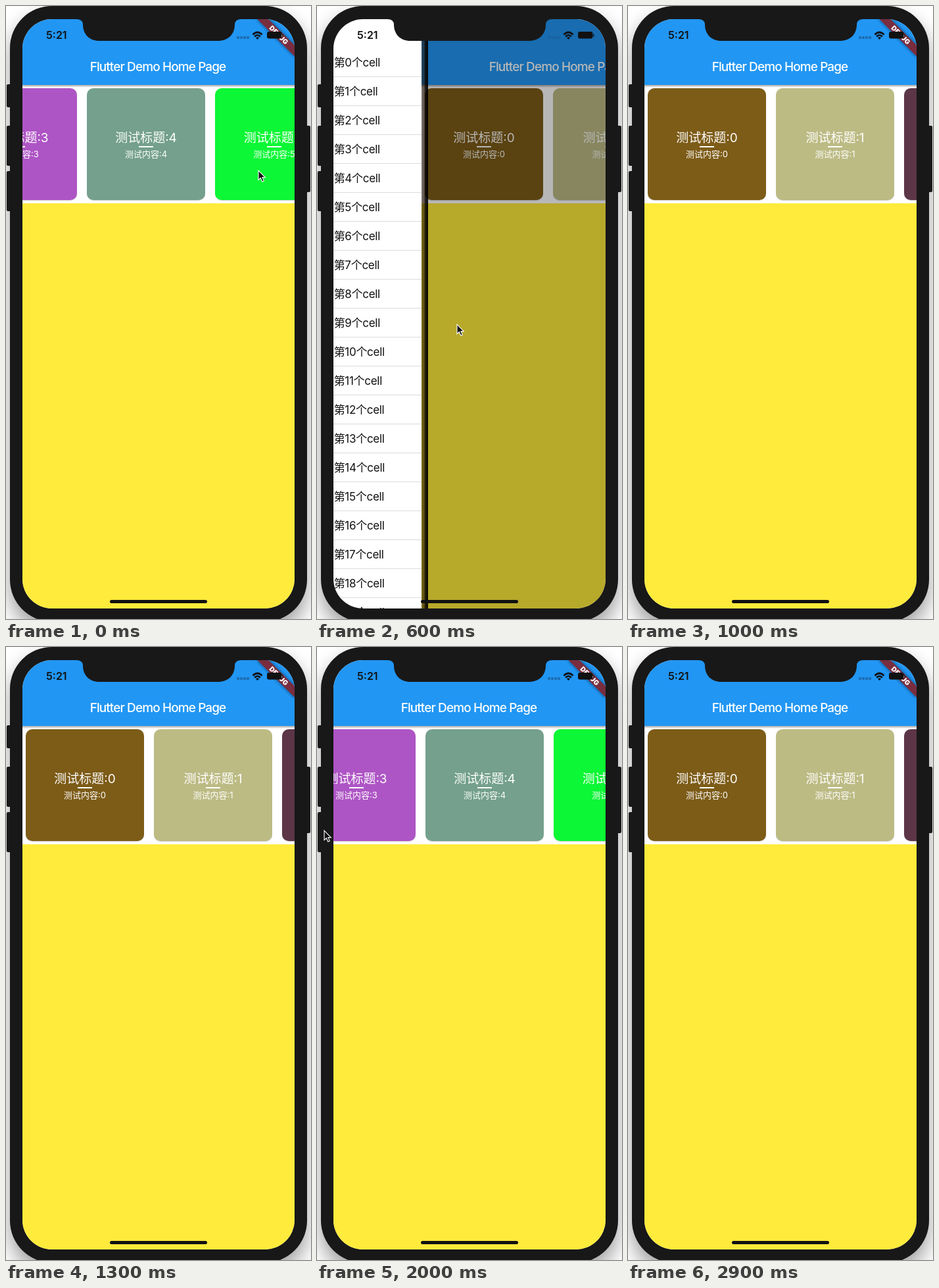
An HTML page that plays this animation: 464 by 932 pixels, repeating every 3000 ms.

```html
<!DOCTYPE html>
<html lang="zh">
<head>
<meta charset="utf-8">
<style>
html, body { margin: 0; width: 100%; height: 100%; overflow: hidden; background: #fff; }
svg { display: block; width: 464px; height: 932px; }
text { font-family: Inter, "Noto Sans CJK SC", "Noto Sans CJK", sans-serif; }
.bar { font-size: 19px; font-weight: 500; letter-spacing: -.9px; fill: #fff; text-anchor: middle; }
.card { fill: #fff; text-anchor: middle; }
.title { font-size: 19px; }
.note { font-size: 13px; }
.cell { font-size: 17px; letter-spacing: -.3px; fill: #111; }
.prefix { letter-spacing: -.5px; text-anchor: end; }
</style>
</head>
<body>
<svg viewBox="0 0 464 932">
  <defs>
    <clipPath id="screen"><rect x="25" y="20" width="414" height="896" rx="45"/></clipPath>
    <filter id="blur" x="-20%" y="-20%" width="140%" height="140%"><feGaussianBlur stdDeviation="15"/></filter>
    <filter id="soft" x="-30%" y="-30%" width="160%" height="160%"><feGaussianBlur stdDeviation="3"/></filter>
    <linearGradient id="edge">
      <stop offset="0" stop-color="#2a1400" stop-opacity=".4"/>
      <stop offset=".4" stop-color="#1c0e00" stop-opacity=".6"/>
      <stop offset=".6" stop-color="#0a0500" stop-opacity=".88"/>
      <stop offset="1" stop-opacity=".93"/>
    </linearGradient>
    <linearGradient id="drop" x2="0" y2="1">
      <stop offset="0" stop-opacity=".35"/><stop offset="1" stop-opacity="0"/>
    </linearGradient>
  </defs>

  <rect x="6" y="16" width="452" height="935" rx="62" opacity=".38" filter="url(#blur)"/>
  <g fill="#181818">
    <rect x="6" width="452" height="936" rx="64"/>
    <rect x="1" y="119" width="8" height="35" rx="2"/>
    <rect x="1" y="182" width="8" height="61" rx="2"/>
    <rect x="1" y="251" width="8" height="61" rx="2"/>
    <rect x="455" y="182" width="8" height="101" rx="2"/>
  </g>

  <g clip-path="url(#screen)">
    <rect x="25" y="20" width="414" height="896" fill="#fff"/>
    <g id="drawer"></g>
    <g id="page">
      <rect x="25" y="120" width="414" height="180" fill="#fff"/>
      <svg x="25" y="120" width="414" height="180" viewBox="25 120 414 180"><g id="cards"></g></svg>
      <rect x="25" y="300" width="414" height="616" fill="#ffeb3b"/>
      <rect x="25" y="20" width="414" height="100" fill="#2196f3"/>
      <rect x="25" y="120" width="414" height="4" fill="url(#drop)"/>
      <text class="bar" x="231" y="99">Flutter Demo Home Page</text>
      <g transform="translate(439 20) rotate(45)">
        <rect x="-40" y="28" width="80" height="12" opacity=".5" filter="url(#soft)"/>
        <rect x="-40" y="28" width="80" height="12" fill="#792d3f"/>
        <text y="37.700" text-anchor="middle" font-size="10.200" font-weight="900" fill="#fff">DEBUG</text>
      </g>
      <g id="shade">
        <rect id="dim" x="25" y="20" width="414" height="896"/>
        <rect x="25" y="20" width="10" height="896" fill="url(#edge)"/>
      </g>
    </g>

    <text x="61" y="50" font-size="16" font-weight="600" fill="#111">5:21</text>
    <g fill="#1d5f9c" opacity=".75">
      <rect x="351" y="46" width="4" height="4" rx="1"/><rect x="356" y="46" width="4" height="4" rx="1"/>
      <rect x="361" y="46" width="4" height="4" rx="1"/><rect x="366" y="46" width="4" height="4" rx="1"/>
    </g>
    <g fill="none" stroke="#111" stroke-width="2.6">
      <path d="M375.500 43.500Q382.500 36.500 389.500 43.500M378.200 46.500Q382.500 42 386.800 46.500"/>
      <path d="M380 48.300Q382.500 46 385 48.300L382.500 51Z" fill="#111" stroke="none"/>
    </g>
    <rect x="397" y="39" width="22.500" height="10.500" rx="3" fill="#111"/>
    <rect x="420.300" y="42.500" width="1.300" height="4" rx=".6" fill="#111"/>
    <rect x="158" y="903" width="148" height="5" rx="2.500" fill="#111"/>
  </g>
  <path d="M107 19V20Q116.500 20 117 28C117 43 127 53 142 53H322C338 53 348 43 348 28Q348.500 20 358 20V19Z" fill="#181818"/>
  <path id="cursor" d="M0 0V14.500L3.400 11.500L5.700 17L8.300 15.900L6 10.600H10.300Z" fill="#111" stroke="#fff" stroke-width="1.100"/>
</svg>

<script>
const $ = id => document.getElementById(id);
const OPEN = 235;
const colors = ['#7d5c18', '#bcbb84', '#5c3647', '#ae55c5', '#74a08d', '#0cf735'];

$('cards').innerHTML = colors.map((c, i) => {
  const x = 30 + 195 * i, mid = x + 90;
  return `<rect x="${x}" y="126" width="180" height="170" rx="10" opacity=".18"/>
    <rect class="face" x="${x}" y="125" width="180" height="170" rx="10" fill="${c}"/>
    <g class="card"><text class="title" x="${mid}" y="207">测试标题:${i}</text>
    <rect x="${mid - 11}" y="213" width="22" height="2"/>
    <text class="note" x="${mid}" y="230">测试内容:${i}</text></g>`;
}).join('');

$('drawer').innerHTML = Array.from({ length: 20 }, (_, i) => {
  const y = 64 + 44 * i;
  return `<text class="cell prefix" x="93" y="${y + 28}">leftVc:</text>
    <text class="cell" x="93" y="${y + 28}">第${i}个cell</text>
    <rect x="25" y="${y + 43}" width="414" height="1" fill="#dcdcdc"/>`;
}).join('');

// time, card scroll, drawer width, cursor x, cursor y
const keys = [
  [0, 687, 0, 384, 250],
  [300, 687, 0, 384, 250],
  [500, 0, 0, 100, 440],
  [600, 0, 134, 213, 484],
  [700, 0, OPEN, 300, 490],
  [800, 0, OPEN, 300, 490],
  [1000, 0, 0, -40, 490],
  [1400, 0, 0, -20, 490],
  [1600, 0, 176, 158, 491],
  [1700, 0, OPEN, 240, 490],
  [1800, 0, 0, 330, 250],
  [2000, 645, 0, 11, 279],
  [2100, 687, 0, 60, 250],
  [2300, 0, 0, 380, 250],
  [2500, 0, 0, 327, 738],
  [2700, 0, 0, 327, 760],
  [2800, 0, 0, 400, 960],
  [2900, 0, 0, 400, 960]
];

function pose(t) {
  const n = Math.max(1, keys.findIndex(k => k[0] >= t));
  const a = keys[n - 1], b = keys[n];
  const u = (t - a[0]) / (b[0] - a[0]);
  return a.map((v, i) => v + (b[i] - v) * u);
}

const move = (id, x, y = 0) => $(id).setAttribute('transform', `translate(${x} ${y})`);
const faces = document.querySelectorAll('.face');

function draw(now) {
  const t = Math.floor(now % 3000 / 100) * 100;
  const [, scroll, width, x, y] = pose(t);
  move('cards', -scroll);
  move('page', width);
  move('drawer', (width - OPEN) * 2 / 3);
  move('cursor', x, y);
  $('shade').setAttribute('visibility', width > 0 ? 'visible' : 'hidden');
  $('dim').setAttribute('opacity', width * .0021);
  faces[1].setAttribute('fill', t > 1400 && t < 1800 ? '#fce08a' : colors[1]);
  requestAnimationFrame(draw);
}
draw(performance.now());
</script>
</body>
</html>
```
